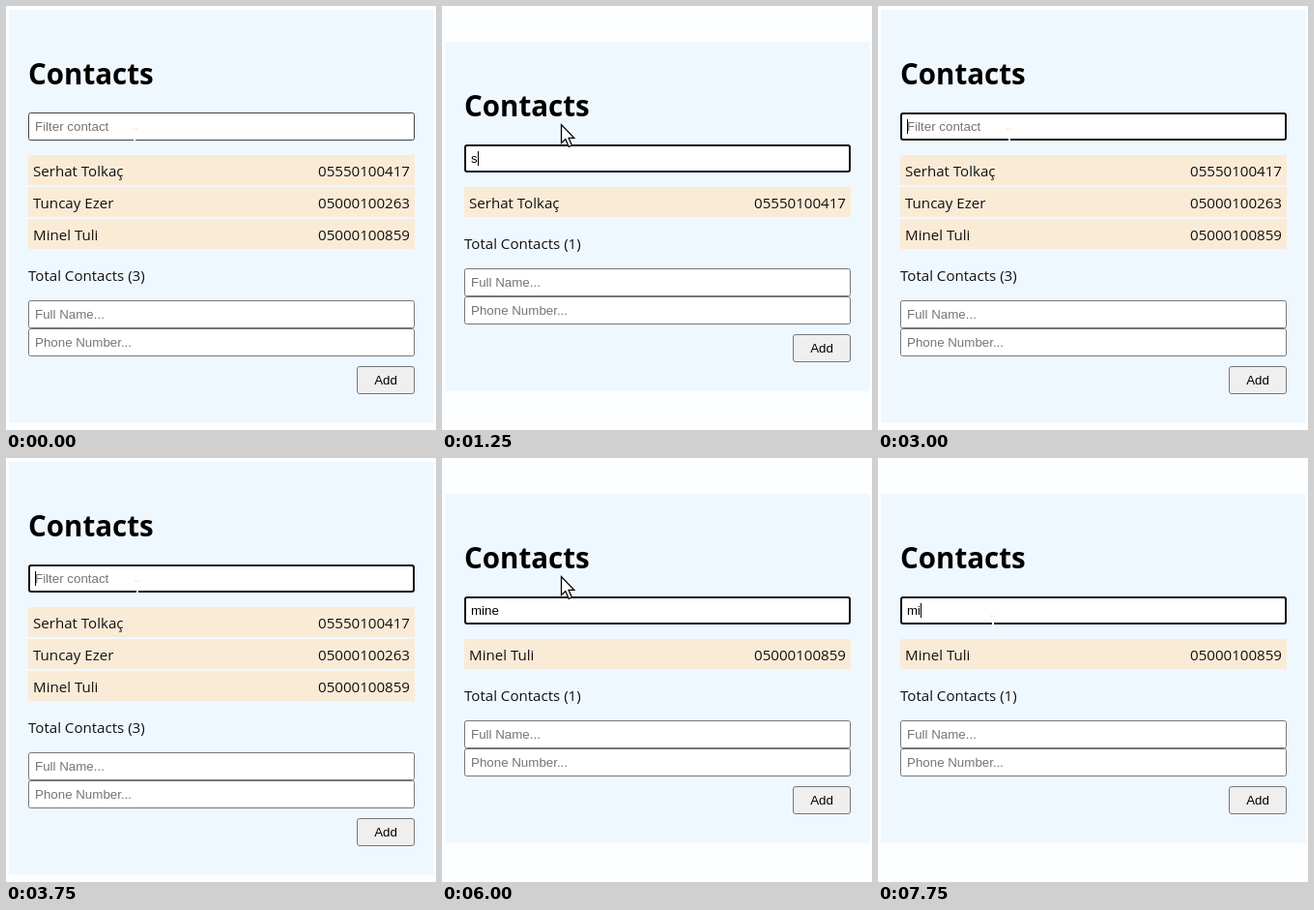
An HTML page for the animation above (8 s loop, 445 by 438 pixels).

```html
<!DOCTYPE html>
<html lang="en">
<head>
<meta charset="utf-8">
<title>Contacts</title>
<style>
  html, body { margin: 0; width: 100%; height: 100%; overflow: hidden; background: #fdfeff; }
  svg { display: block; width: 445px; height: 438px; }
  text { font: 15.1px "Open Sans", sans-serif; fill: #111; white-space: pre; }
  .title { font-size: 29.5px; font-weight: 700; fill: #000; }
  .field { font: 13.333px "Liberation Sans", Arial, sans-serif; fill: #000; }
  .hint { fill: #757575; }
  .end { text-anchor: end; }
  .mid { text-anchor: middle; }
  .box { fill: #fff; stroke: #767676; }
</style>
</head>
<body>
<svg viewBox="0 0 445 438">
  <rect id="panel" x="3" width="440" fill="#f0f8ff"/>
  <g id="top">
    <text class="title" x="23" y="81">Contacts</text>
    <rect id="filter"/>
    <text id="hint" class="field hint" x="30" y="129">Filter contact</text>
    <text id="query" class="field" x="30" y="129"></text>
    <rect id="caret" y="117" width="1" height="15"/>
    <g id="rows"></g>
  </g>
  <g id="bottom">
    <text id="total" x="23" y="284"></text>
    <rect class="box" x="23.5" y="304.5" width="399" height="28" rx="2"/>
    <text class="field hint" x="30" y="323">Full Name...</text>
    <rect class="box" x="23.5" y="333.5" width="399" height="28" rx="2"/>
    <text class="field hint" x="30" y="352">Phone Number...</text>
    <rect x="363.5" y="372.5" width="59" height="28" rx="2.5" fill="#efefef" stroke="#767676"/>
    <text class="field mid" x="393" y="391">Add</text>
  </g>
  <path id="arrow" d="M.5.5V19.5L4.8 15.6 8.2 23.5 11.4 22 8.1 14.4H13.8Z" fill="#fff" stroke="#000" stroke-width="1.3"/>
  <g id="beam">
    <path d="M-2.5-4.5 0-2 2.5-4.5" fill="none" stroke="#ddd"/>
    <path d="M0-8V9" stroke="#fff" stroke-width="2"/>
  </g>
</svg>
<script>
const DURATION = 8000, ROW_STEP = 33;
const contacts = [
  ["Serhat Tolkaç", "05550100417"],
  ["Tuncay Ezer", "05000100263"],
  ["Minel Tuli", "05000100859"],
];

// Each step changes only the listed properties.
const steps = [
  [0, { query: "", focus: false, caret: false, pointer: "beam", x: 133, y: 131 }],
  [250, { focus: true, caret: true }],
  [750, { caret: false }],
  [1250, { query: "s", caret: true, pointer: "arrow", x: 123, y: 122 }],
  [1500, { query: "ser" }],
  [1750, { query: "serh" }],
  [2250, { caret: false }],
  [2500, { query: "ser", caret: true }],
  [2750, { query: "s" }],
  [3000, { query: "", pointer: "beam", x: 136, y: 131 }],
  [3250, { caret: false }],
  [3750, { caret: true }],
  [4250, { query: "m", pointer: "arrow", x: 123, y: 122 }],
  [4500, { query: "mi" }],
  [5000, { caret: false }],
  [5500, { query: "mine", caret: true }],
  [6000, { caret: false }],
  [6500, { caret: true, x: 118, y: 124 }],
  [6750, { pointer: "beam", x: 119, y: 171 }],
  [7000, { caret: false, y: 167 }],
  [7500, { caret: true }],
  [7750, { query: "mi" }],
];

const $ = id => document.getElementById(id);
const set = (el, attrs) => Object.entries(attrs).forEach(([k, v]) => el.setAttribute(k, v));
const show = (el, on) => set(el, { visibility: on ? "visible" : "hidden" });
const move = (el, x, y) => set(el, { transform: `translate(${x} ${y})` });

$("rows").innerHTML = contacts.map(([name, phone]) => `<g>
  <rect x="23" y="154" width="400" height="31" fill="#faebd7"/>
  <text x="28" y="176">${name}</text>
  <text class="end" x="418" y="176">${phone}</text></g>`).join("");
const rows = [...$("rows").children];

function draw(time) {
  const state = Object.assign({}, ...steps.filter(([at]) => at <= time).map(([, change]) => change));

  let count = 0;
  rows.forEach((row, i) => {
    const match = contacts[i][0].toLowerCase().includes(state.query);
    show(row, match);
    if (match) move(row, 0, ROW_STEP * count++);
  });

  // The panel stays vertically centred as the list shrinks.
  const removed = ROW_STEP * (contacts.length - count), shift = removed / 2;
  set($("panel"), { y: 4 + shift, height: 427 - removed });
  move($("top"), 0, shift);
  move($("bottom"), 0, shift - removed);
  $("total").textContent = `Total Contacts (${count})`;

  const inset = state.focus ? 1 : 0.5;
  set($("filter"), {
    x: 23 + inset, y: 110 + inset, width: 400 - 2 * inset, height: 29 - 2 * inset,
    rx: 2, fill: "#fff", stroke: state.focus ? "#101010" : "#444", "stroke-width": 2 * inset,
  });
  show($("hint"), !state.query);
  $("query").textContent = state.query;
  set($("caret"), { x: Math.round(30 + (state.query ? $("query").getComputedTextLength() : 0)) });
  show($("caret"), state.caret);

  for (const kind of ["arrow", "beam"]) {
    show($(kind), state.pointer === kind);
    move($(kind), state.x, state.y);
  }
}

const start = performance.now();
function tick() {
  draw((performance.now() - start) % DURATION);
  requestAnimationFrame(tick);
}
tick();
</script>
</body>
</html>
```
